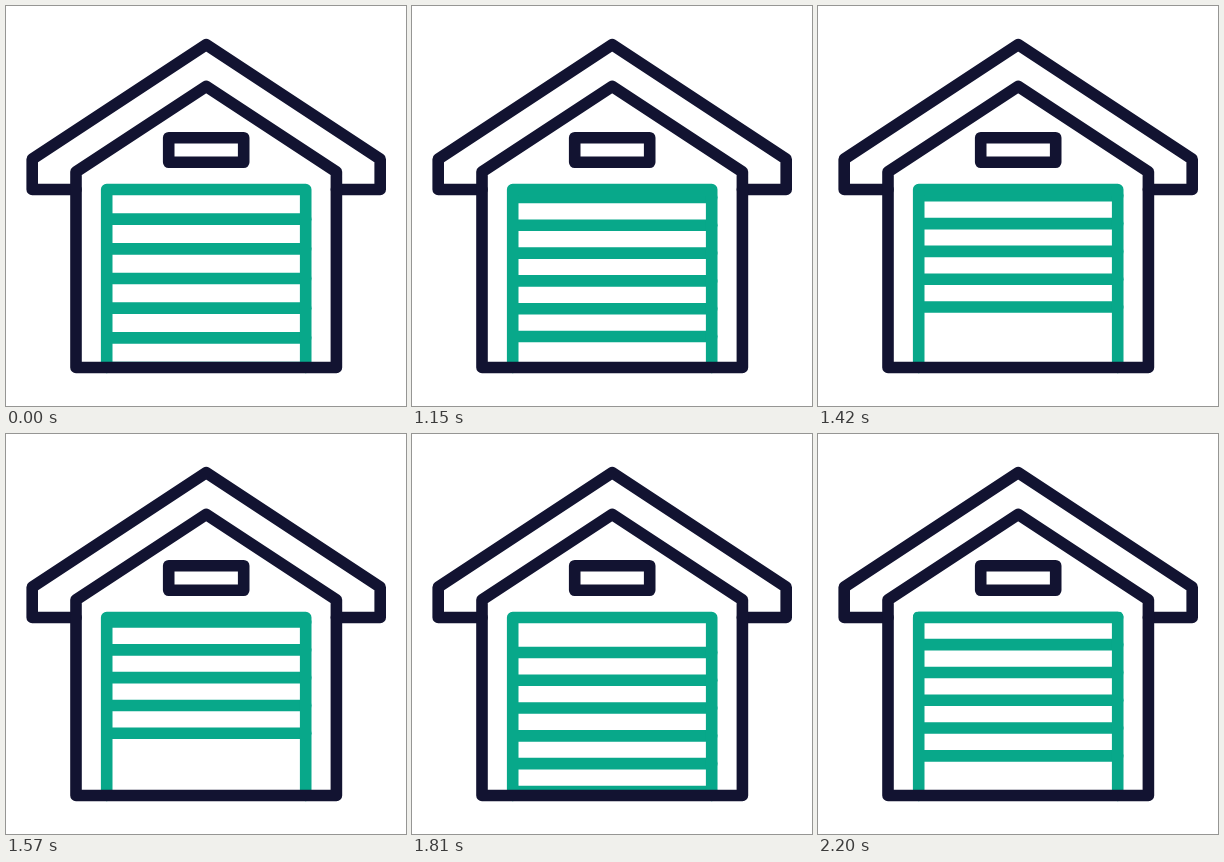
These frames come from a looping animation (400x400 px, 2230 ms). An HTML page with a canvas:

```html
<!DOCTYPE html>
<html lang="en">
<head>
<meta charset="utf-8">
<title>Garage door</title>
<style>
  html, body { margin: 0; width: 100%; height: 100%; overflow: hidden; background: #fff; }
  canvas { display: block; width: 400px; height: 400px; }
</style>
</head>
<body>
<canvas id="stage" width="400" height="400"></canvas>
<script>
const ctx = document.getElementById('stage').getContext('2d');
const NAVY = '#121331', GREEN = '#08a88a', STROKE = 11.6;
const LOOP = 2230, START = 1030, STEP = 30;
const LIFT = 1015, PEAK = 1540, LAND = 1818;
const MIDDLE = 200.2, LINTEL = 183.5, FLOOR = 361.5;
const SLATS = 6, PITCH = 27.8, HEIGHT = 62.6;

const clamp = x => Math.min(1, Math.max(0, x));
const easeIn = x => clamp(x) ** 2.3;
const easeOut = x => 1 - easeIn(1 - x);

// How far the door is raised: up, down, then up again by two thirds.
function raised(t) {
  const rise = PEAK - LIFT;
  if (t < PEAK) return HEIGHT * easeOut((t - LIFT) / rise);
  if (t < LAND) return HEIGHT * (1 - easeIn((t - PEAK) / (LAND - PEAK)));
  return HEIGHT * 2 / 3 * easeOut((t - LAND) / rise);
}

function line(color, points, closed) {
  ctx.strokeStyle = color;
  ctx.beginPath();
  points.forEach(([x, y]) => ctx.lineTo(x, y));
  if (closed) ctx.closePath();
  ctx.stroke();
}

// Draws half an outline, given as [distance from the middle, y], and its mirror image.
function mirrored(color, half, closed) {
  const left = half.map(([dx, y]) => [MIDDLE - dx, y]);
  const right = half.map(([dx, y]) => [MIDDLE + dx, y]).reverse();
  line(color, [...left, ...right], closed);
}

function drawDoor(t) {
  const bottom = FLOOR - raised(t);
  // The slats close up slightly before the door starts to roll.
  const pitch = t < PEAK ? Math.max(PITCH, (bottom - LINTEL) / SLATS) : PITCH;
  const top = LINTEL - STROKE / 2;
  ctx.save();
  ctx.beginPath();
  ctx.rect(95, top, 211, FLOOR - top);
  ctx.clip();
  for (let i = 0; i < SLATS; i++) mirrored(GREEN, [[99.5, bottom - i * pitch]]);
  ctx.restore();
  mirrored(GREEN, [[99.5, FLOOR], [99.5, LINTEL]]);
}

function drawHouse() {
  mirrored(NAVY, [[130.2, 183.5], [174, 183.5], [174, 153.2], [0, 38.7]]);
  mirrored(NAVY, [[130.2, FLOOR], [130.2, 165.8], [0, 80.3]], true);
  mirrored(NAVY, [[37.5, 156.3], [37.5, 131.7]], true);
}

function render(now) {
  const t = now % LOOP;
  ctx.fillStyle = '#fff';
  ctx.fillRect(0, 0, 400, 400);
  ctx.lineWidth = STROKE;
  ctx.lineCap = ctx.lineJoin = 'round';
  drawDoor(t < START ? 0 : START + Math.floor((t - START) / STEP) * STEP);
  drawHouse();
}

const origin = performance.now();
function tick() {
  render(performance.now() - origin);
  requestAnimationFrame(tick);
}
tick();
</script>
</body>
</html>
```
